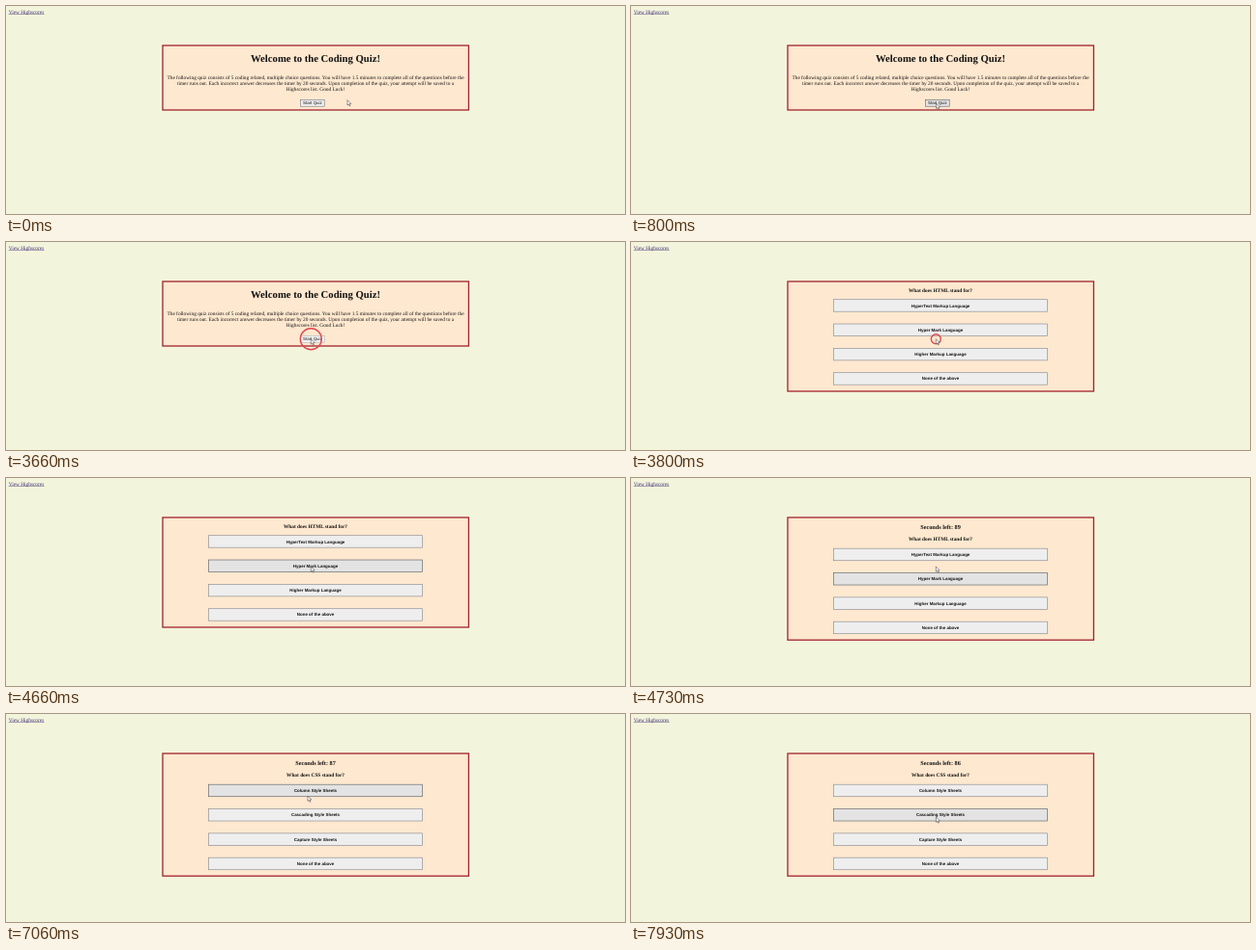
These frames come from a looping animation (640x216 px, 8 s). An HTML page with a canvas:

```html
<!DOCTYPE html>
<html lang="en">
<head>
<meta charset="utf-8">
<title>Coding Quiz</title>
<style>
  html, body { margin: 0; width: 100%; height: 100%; overflow: hidden; background: #f2f5db; }
  canvas { display: block; width: 640px; height: 216px; }
</style>
</head>
<body>
<canvas id="stage"></canvas>
<script>
const LOOP = 8000;
const SERIF = '"Liberation Serif", serif';
const SANS = '"Liberation Sans", sans-serif';
const CENTER = 320;

const INTRO = [
  'The following quiz consists of 5 coding related, multiple choice questions. You will have 1.5 minutes to complete all of the questions before the',
  'timer runs out. Each incorrect answer decreases the timer by 20 seconds. Upon completion of the quiz, your attempt will be saved to a',
  'Highscores list. Good Luck!'
];
const QUESTIONS = [
  { title: 'What does HTML stand for?',
    answers: ['HyperText Markup Language', 'Hyper Mark Language', 'Higher Markup Language', 'None of the above'] },
  { title: 'What does CSS stand for?',
    answers: ['Column Style Sheets', 'Cascading Style Sheets', 'Capture Style Sheets', 'None of the above'] }
];

const QUIZ_START = 3725, FIRST_TICK = 4725, NEXT_QUESTION = 5990;
const CLICKS = [{ down: 3595, up: 3700 }, { down: 5925, up: 5975 }];
// Pointer waypoints: time, x, y
const PATH = [
  [0, 353, 97.6], [40, 353, 97.6], [800, 315.6, 101.2], [3200, 315.6, 101.2], [3330, 315.3, 100.7],
  [4150, 315.3, 100.7], [4650, 315.3, 92], [5000, 315.3, 91.5], [5460, 311.6, 82.7],
  [6900, 311.6, 82.7], [7730, 315.4, 107], [LOOP, 315.4, 107]
];

const canvas = document.getElementById('stage');
const ctx = canvas.getContext('2d');
const ratio = window.devicePixelRatio || 1;
canvas.width = 640 * ratio;
canvas.height = 216 * ratio;

function pointerAt(t) {
  const i = Math.max(1, PATH.findIndex(p => p[0] > t));
  const [t0, x0, y0] = PATH[i - 1], [t1, x1, y1] = PATH[i];
  const u = (t - t0) / (t1 - t0), k = u * u * (3 - 2 * u);
  return { x: x0 + (x1 - x0) * k, y: y0 + (y1 - y0) * k };
}

// Page text is laid out at full size and shown at one third.
function text(str, x, y, font, color = '#111', align = 'center') {
  ctx.save();
  ctx.translate(x, y);
  ctx.scale(1 / 3, 1 / 3);
  ctx.font = font;
  ctx.textAlign = align;
  ctx.textRendering = 'geometricPrecision';
  ctx.fillStyle = color;
  ctx.fillText(str, 0, 0);
  ctx.restore();
}

function box(x, y, w, h, fill, stroke, line) {
  ctx.fillStyle = fill;
  ctx.fillRect(x, y, w, h);
  ctx.strokeStyle = stroke;
  ctx.lineWidth = line;
  ctx.strokeRect(x, y, w, h);
}

const panel = bottom => box(162, 41, 316.4, bottom - 41, '#fee8cf', '#a3222e', 1.3);

const inside = (p, x, y, w, h) => p.x >= x && p.x <= x + w && p.y >= y && p.y <= y + h;

function welcome(pointer, pressed) {
  panel(108);
  text('Welcome to the Coding Quiz!', CENTER, 58, `bold 32px ${SERIF}`);
  INTRO.forEach((line, i) => text(line, CENTER, 75.7 + i * 6.1, `16px ${SERIF}`));
  const area = [304.6, 97.4, 24.6, 6.8];
  const hover = inside(pointer, ...area);
  const fill = pressed ? '#f5f5f5' : hover ? '#e4e4e5' : '#efeff0';
  box(...area, fill, pressed ? '#b0b0b0' : hover ? '#5f5f66' : '#77777e', .6);
  text('Start Quiz', 316.9, 102.4, `13.33px ${SANS}`);
}

function quiz(t, pointer) {
  const timed = t >= FIRST_TICK;
  const shift = timed ? 13.5 : 0;
  const { title, answers } = QUESTIONS[t < NEXT_QUESTION ? 0 : 1];
  panel(155 + shift * .98);
  if (timed) {
    const seconds = 89 - Math.floor((t - FIRST_TICK) / 1000);
    text(`Seconds left: ${seconds}`, CENTER, 53, `bold 18.72px ${SERIF}`);
  }
  text(title, CENTER, 51.9 + shift, `bold 16px ${SERIF}`);
  // Hover lags briefly behind the layout shift.
  const lag = timed && t < FIRST_TICK + 70;
  answers.forEach((answer, i) => {
    const area = [209.4, 59.7 + shift + i * 25.33, 221.2, 12.5];
    const hover = lag ? i === 1 : inside(pointer, ...area);
    box(...area, hover ? '#e3e3e3' : '#eeeeef', hover ? '#6c6c70' : '#929296', .7);
    text(answer, CENTER, area[1] + 7.8, `bold 13.33px ${SANS}`);
  });
}

function clickRing(t, { x, y }) {
  for (const { down, up } of CLICKS) {
    const radius = 11 - Math.max(0, t - up) * .06;
    if (t < down || radius < 2) continue;
    ctx.beginPath();
    ctx.arc(x, y, radius, 0, 2 * Math.PI);
    ctx.strokeStyle = '#e0484f';
    ctx.lineWidth = 1.4;
    ctx.stroke();
  }
}

function arrow({ x, y }) {
  ctx.save();
  ctx.translate(x, y);
  ctx.beginPath();
  for (const [dx, dy] of [[0, 0], [0, 5.4], [1.3, 4.3], [2.2, 6.3], [3, 5.9], [2.2, 4], [3.8, 3.9]]) ctx.lineTo(dx, dy);
  ctx.closePath();
  ctx.fillStyle = '#fff';
  ctx.fill();
  ctx.strokeStyle = '#333';
  ctx.lineWidth = .5;
  ctx.stroke();
  ctx.restore();
}

function draw(t) {
  ctx.setTransform(ratio, 0, 0, ratio, 0, 0);
  ctx.fillStyle = '#f2f5db';
  ctx.fillRect(0, 0, 640, 216);
  text('View Highscores', 2.7, 7.5, `16px ${SERIF}`, '#45307a', 'left');
  ctx.fillStyle = '#45307a';
  ctx.fillRect(2.7, 8.1, 36.9, .45);

  const pointer = pointerAt(t);
  if (t < QUIZ_START) welcome(pointer, t >= CLICKS[0].down);
  else quiz(t, pointer);
  clickRing(t, pointer);
  arrow(pointer);
}

const start = performance.now();
function frame() {
  draw((performance.now() - start) % LOOP);
  requestAnimationFrame(frame);
}
frame();
</script>
</body>
</html>
```
